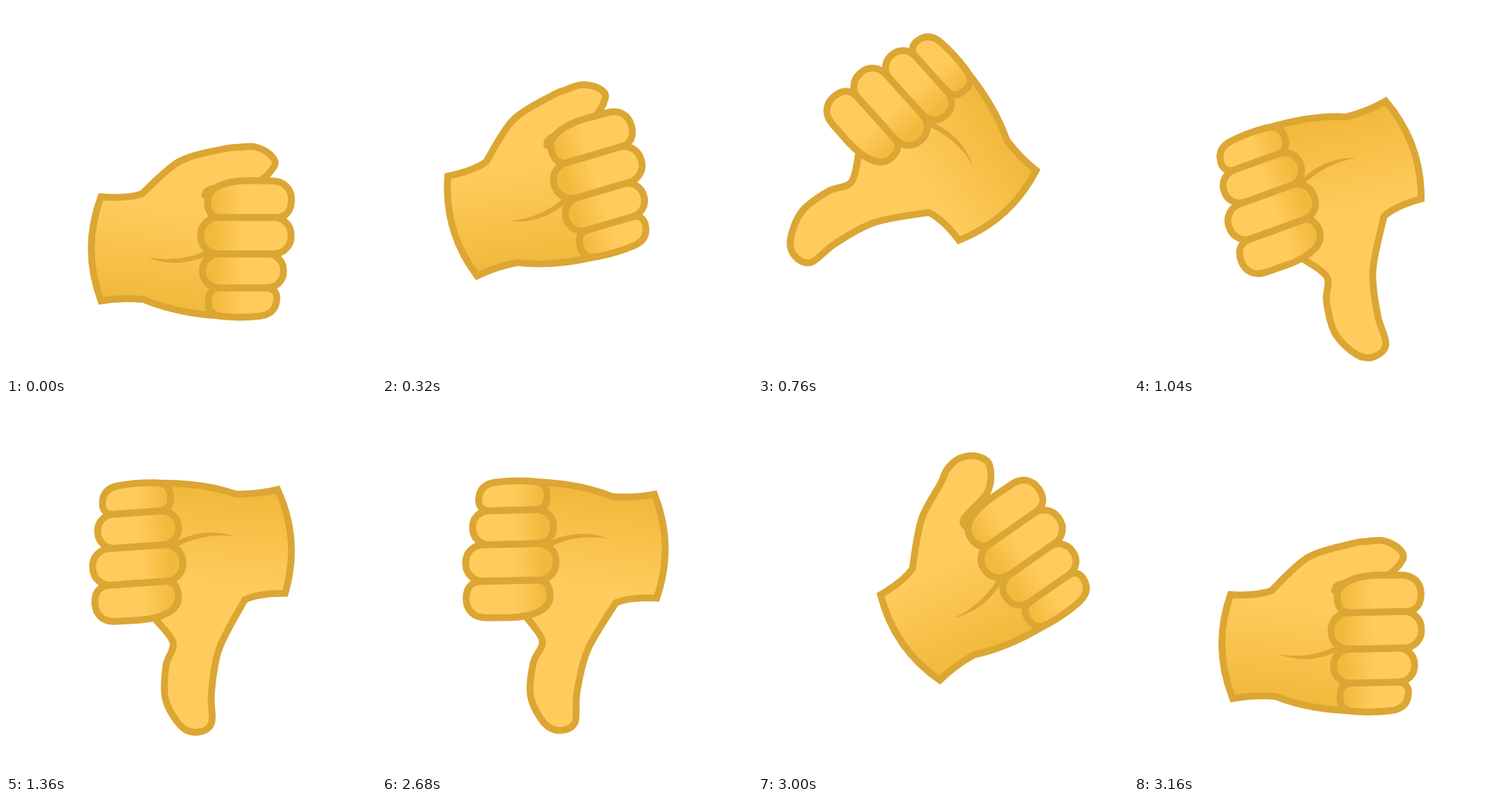
Write an HTML page that moves like this. It is 512 px wide and 512 px high and loops after 3.2 s.

```html
<!DOCTYPE html>
<html lang="en">
<head>
<meta charset="utf-8">
<title>Thumb turning down</title>
<style>
  html, body { margin: 0; width: 100%; height: 100%; overflow: hidden; background: #fff; }
  svg { display: block; width: 100%; height: 100%; }
  .line { fill: none; stroke: #dba633; stroke-width: 9.5; stroke-linecap: round; }
  .finger { fill: url(#fingerShade); stroke: #dba633; stroke-width: 9.5; }
</style>
</head>
<body>
<svg viewBox="0 0 512 512">
  <defs>
    <linearGradient id="skin" gradientUnits="userSpaceOnUse" x1="252" y1="270" x2="230" y2="418">
      <stop offset=".1" stop-color="#ffcb5c"/>
      <stop offset="1" stop-color="#f1b93b"/>
    </linearGradient>
    <linearGradient id="fingerShade" gradientUnits="userSpaceOnUse" x1="286" y1="0" x2="328" y2="0">
      <stop offset="0" stop-color="#f2ba3c"/>
      <stop offset="1" stop-color="#ffcb5c"/>
    </linearGradient>
  </defs>
  <g id="hand">
    <path id="body" fill="url(#skin)"/>
    <path id="outline" class="line" stroke-miterlimit="6"/>
    <path fill="#dba633" d="M196 348Q240 356 278 338V346Q235 364 196 348Z"/>
    <path class="finger" d="M298 390H358C372 390 376 398 374.500 408C373 420 366 427 352 429Q326 432 300 429.500C284 428 279 420 280 408C280 396 286 390 298 390Z"/>
    <rect class="finger" x="272" y="343" width="112" height="47" rx="22.500"/>
    <rect class="finger" x="269.500" y="292.500" width="125" height="50.500" rx="24"/>
    <path class="finger" d="M294 292.500C282 292 278 280 279 268C281 252 300 242 335 241.500L367 242C386 242 395 254 395 268C395 283 388 292.500 374 292.500Z"/>
  </g>
</svg>
<script>
const LOOP = 3200, STEP = 40;

// Thumb contour from the knuckle around the tip to the web.
const FOLDED = [[188, 260], [240, 215], [300, 198], [322, 195.5], [345, 195],
                [366, 206], [371, 222], [343, 246], [285, 253], [275, 262]];
const OPEN = [[188, 259], [228, 194], [243, 134], [246, 92], [267, 81],
              [289, 92], [307, 130], [303, 176], [291, 207], [313, 241]];

// Wrist centre and angle of the key poses.
const FIST = { at: [128, 336], turn: 0 };
const LIFT = { at: [108, 305.5], turn: -16.4 };
const DIP = { at: [376, 198], turn: -200 };
const DOWN = { at: [384.5, 190], turn: -184.1 };

const mix = (a, b, k) => a + (b - a) * k;
const mixPoint = (p, q, k) => [mix(p[0], q[0], k), mix(p[1], q[1], k)];

// Cubic ease with flat ends; a and b are the handle times.
function ease(x, a = 1 / 3, b = 2 / 3) {
  if (x <= 0) return 0;
  if (x >= 1) return 1;
  let lo = 0, hi = 1;
  for (let i = 0; i < 24; i++) {
    const s = (lo + hi) / 2, r = 1 - s;
    if (3 * r * r * s * a + 3 * r * s * s * b + s * s * s < x) lo = s; else hi = s;
  }
  return lo * lo * (3 - 2 * lo);
}

// The wrist follows a quadratic curve towards the bend point, or a straight line without one.
function travel(from, to, turned, open, moved = turned, bend = mixPoint(from.at, to.at, .5)) {
  return {
    at: mixPoint(mixPoint(from.at, bend, moved), mixPoint(bend, to.at, moved), moved),
    turn: mix(from.turn, to.turn, turned),
    open
  };
}

function poseAt(t) {
  if (t < 480) return travel(FIST, LIFT, ease(t / 320), 0);
  if (t < 1040) {
    const swing = ease((t - 480) / 560, 1 / 3, .461);
    return travel(LIFT, DIP, swing, ease((t - 480) / 280), swing, [364, 339]);
  }
  if (t < 2640) return travel(DIP, DOWN, ease((t - 1040) / 320), 1);
  const back = (t - 2640) / 560, moved = ease(back, .24, .56);
  return travel(DOWN, FIST, ease(back, 1 / 3, .485), 1 - moved, moved, [337, 322]);
}

// Curve through all points, each tangent parallel to the line between its neighbours.
function smooth(points) {
  const at = i => points[Math.max(0, Math.min(points.length - 1, i))];
  const handle = (i, side) => at(i).map((v, axis) => v + side * (at(i + 1)[axis] - at(i - 1)[axis]) / 6);
  return points.slice(1).map((p, i) => `C${handle(i, 1)} ${handle(i + 1, -1)} ${p}`).join("");
}

const [hand, body, outline] = ["hand", "body", "outline"].map(id => document.getElementById(id));

function draw(now) {
  const t = Math.floor(now % LOOP / STEP) * STEP;
  const { at, turn, open } = poseAt(t);
  const thumb = FOLDED.map((p, i) => mixPoint(p, OPEN[i], open));
  const d = "M300 429C262 427 225 421 190 406Q160 403 131.500 408Q104.500 336 131.500 264" +
            `Q167 267 ${thumb[0]}` + smooth(thumb);
  outline.setAttribute("d", d);
  body.setAttribute("d", d + "L330 280V425Z");
  hand.setAttribute("transform", `translate(${at}) rotate(${turn}) translate(-128 -336)`);
}

const start = performance.now();
function tick() {
  draw(performance.now() - start);
  requestAnimationFrame(tick);
}
tick();
</script>
</body>
</html>
```
